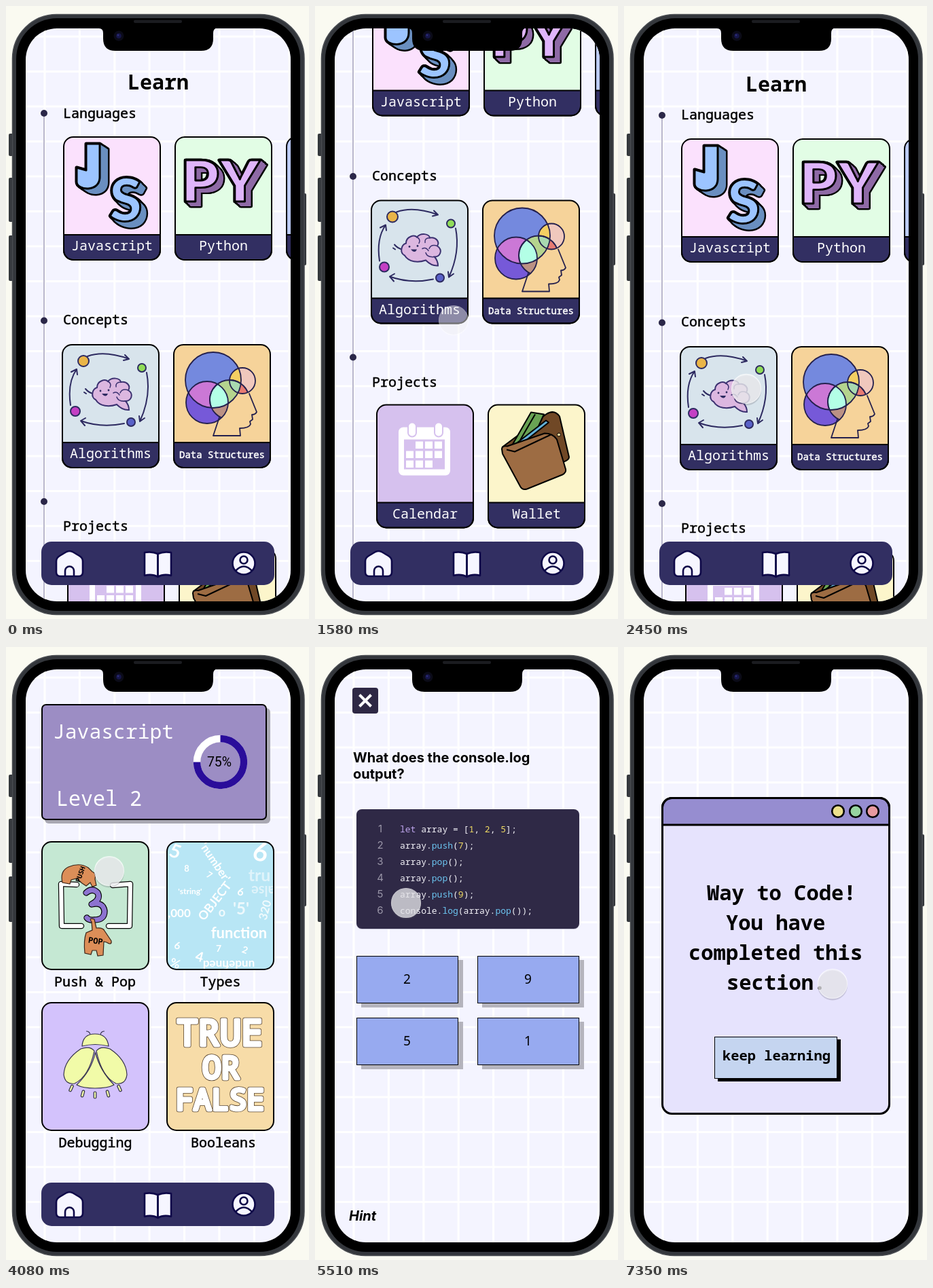
Write an HTML page that moves like this. It is 446 px wide and 903 px high and loops after 8 s.

```html
<!DOCTYPE html>
<html lang="en">
<head>
<meta charset="utf-8">
<title>Learning app</title>
<style>
html, body { margin: 0; width: 100%; height: 100%; overflow: hidden; background: #fafaf1; }
svg { display: block; width: 100%; height: 100%; }
text { white-space: pre; font-family: "Noto Sans Mono", monospace; }
.sans { font-family: Inter, sans-serif; }
.medium { stroke: currentColor; stroke-width: .5px; }
.heavy { font: 900 87px Lato, sans-serif; }
.round { fill: none; stroke-linecap: round; stroke-linejoin: round; }
</style>
</head>
<body>
<svg id="stage" viewBox="0 0 446 903"></svg>
<script>
const INK = '#2d2a60', NAVY = '#322f62';

// ---- drawing helpers ----
const rect = (x, y, w, h, fill, extra = '') =>
  `<rect x="${x}" y="${y}" width="${w}" height="${h}" fill="${fill}" ${extra}/>`;
const circle = (x, y, r, fill, extra = '') =>
  `<circle cx="${x}" cy="${y}" r="${r}" fill="${fill}" ${extra}/>`;
const path = (d, fill = 'none', extra = '') => `<path d="${d}" fill="${fill}" ${extra}/>`;
const text = (x, y, size, label, extra = '') =>
  `<text x="${x}" y="${y}" font-size="${size}" ${extra}>${label}</text>`;
const group = (content, extra = '') => `<g ${extra}>${content}</g>`;
const centred = 'text-anchor="middle"';
const outline = (width, color = '#000') => `stroke="${color}" stroke-width="${width}"`;

// Thick line with a dark rim
const tube = (d, color, width) =>
  path(d, 'none', `class="round" ${outline(width + 2.4)}`) +
  path(d, 'none', `class="round" ${outline(width, color)}`);

// Solid letter with depth towards (dx, dy)
function extrude(shape, dx, dy, face, side) {
  const layers = Array.from({ length: 12 }, (_, i) =>
    group(shape, `transform="translate(${dx * (1 - i / 11)} ${dy * (1 - i / 11)})"`)).join('');
  return group(layers, `fill="#000" ${outline(5)} stroke-linejoin="round"`) +
    group(layers, `fill="${side}"`) +
    group(shape, `fill="${face}" ${outline(3)} stroke-linejoin="round"`);
}

function topicCard(x, y, label, color, art, size = 20) {
  const weight = size < 20 ? 'class="medium"' : '';
  return rect(x, y, 142, 181, color, 'rx="14"') + art +
    path(`M${x} ${y + 144}h142v23a14 14 0 0 1-14 14h-114a14 14 0 0 1-14-14z`, NAVY, outline(2)) +
    rect(x, y, 142, 181, 'none', `rx="14" ${outline(2)}`) +
    text(x + 71, y + 167, size, label, `${centred} ${weight} fill="#fff" color="#fff"`);
}

// ---- home page ----
const jsArt =
  extrude(path('M118 203H138V252C138 275 104 272 104 259V238L118 242Z', 'inherit'), 12, 8, '#9cc4ff', '#6a8fc0') +
  extrude('<text class="heavy" x="152" y="317">S</text>', 9, 9, '#9cc4ff', '#6a8fc0');

const pyArt = group(
  extrude('<text class="heavy" x="258" y="288">P</text>', 8, 8, '#dfb5fb', '#8f6aa6') +
  extrude('<text class="heavy" x="315" y="288">Y</text>', 9, 8, '#dfb5fb', '#8f6aa6'),
  'transform="translate(0 14) scale(1 .95)"');

const brainArt =
  path(`M120 516Q145 507 181 520M175 514L181 520 173 522 M207 540Q214 575 197 612M196 604L197 612 204 607
    M174 615Q140 622 110 611M117 607L110 611 116 618 M95 588Q90 555 104 535M96 539L104 535 105 543
    M129 571Q122 570 117 564M118 571L115 569`, 'none', `class="round" ${outline(2, INK)}`) +
  [[114, 523, 8, '#eab548'], [200, 533, 6, '#90dc58'], [184, 613, 6, '#5a62c8'], [102, 597, 7, '#c43fc4']]
    .map(([x, y, r, color]) => circle(x, y, r, color, outline(2, INK))).join('') +
  path(`M132 580C124 576 127 564 134 562C134 552 146 549 150 553C156 546 168 548 169 554C178 552 184 560 180 566
    C189 572 184 582 176 582Q181 588 181 595C172 596 166 590 163 587C152 591 138 590 132 580Z`,
    '#dcb7e0', outline(2, '#3b3170')) +
  path('M150 553Q156 556 153 562M169 554Q161 554 162 561M180 566Q171 563 168 570M176 582Q165 583 163 576M158 570Q163 567 167 573',
    'none', `class="round" ${outline(1.5, '#3b3170')}`) +
  circle(139, 567, 1.4, INK) + circle(151, 566, 1.4, INK) + path('M141 571H150Q147 578 141 571Z', INK);

const rings = [[305, 551, 41], [296, 584, 31], [329, 580, 29], [348, 552, 19]];
const ring = (i, fill, extra) => circle(...rings[i], fill, extra);
const within = (i, content) => group(content, `clip-path="url(#ring${i})"`);
const ringLine = i => ring(i, 'none', outline(1.8, '#24204d'));
const headArt =
  ring(0, '#7489de') + ring(1, '#7659d8') + ring(3, '#f0c8bd') +
  within(0, ring(1, '#cb78d6') + ring(2, '#b5d48e') + ring(3, '#f4cf62')) +
  within(1, ring(2, '#bb9184') + within(0, ring(2, '#b3ffe6'))) +
  within(2, ring(3, '#e77b72') + within(0, ring(3, '#a8d9b0'))) +
  [0, 1, 3].map(i => ringLine(i) + within(i, ringLine(2))).join('') +
  path('M358 571L369 598Q367 602 362 602L363 609 359 612 360 616Q358 622 344 622L345 633H305L314 606', 'none',
    `class="round" ${outline(1.8, '#24204d')}`);

// Days of the month, without the first and last
const days = Array.from({ length: 12 }, (_, i) => i % 11 === 0 ? '' :
  rect(134 + i % 4 * 14, 854 + Math.floor(i / 4) * 14, 11, 10.5, '#fff')).join('');
const calendarArt = rect(123, 833, 76, 71, '#fff', 'rx="7"') +
  rect(131, 851, 60, 44, '#d6c1ee') + days +
  [143, 182].map(x => rect(x - 6, 826, 12, 21, '#fff', `rx="6" ${outline(2, '#d6c1ee')}`)).join('');

const walletArt = group(
  path('M276 862L340 814Q352 806 360 817L374 877Q374 881 366 884L340 890Z', '#704826') +
  path('M291 858L318 811 337 814 326 838 298 862Z', '#69a354') +
  path('M302 852L324 814') +
  path('M287 864L340 823 344 826 292 867Z', '#62b0d8') +
  path('M275 865Q275 860 283 861L338 842Q350 842 356 851L369 895Q370 900 364 903L312 924Q305 926 302 920L276 872Z', '#9d6c43') +
  path('M282 866L294 869 347 844') + circle(359, 844, 2.5, '#eed79a', 'stroke-width="1"'),
  `${outline(2)} stroke-linejoin="round"`);

const heading = (y, label, dotY) =>
  circle(56, dotY, 5, '#2b2748') + text(84, y, 20, label, 'class="medium"');

const homePage =
  rect(55, 158, 2, 1000, '#b9b7cc') +
  text(179, 123, 30, 'Learn', 'font-weight="700"') +
  heading(164.5, 'Languages', 158) + heading(469, 'Concepts', 463.5) + heading(773, 'Projects', 730) +
  topicCard(85, 193, 'Javascript', '#fbe1fd', jsArt) +
  topicCard(249, 193, 'Python', '#e2fde5', pyArt) +
  topicCard(413, 193, '', '#bccbf6', '') +
  topicCard(83, 499, 'Algorithms', '#d8e4ec', brainArt) +
  topicCard(247, 499, 'Data Structures', '#f6d39a', headArt, 14) +
  topicCard(91, 800, 'Calendar', '#d6c1ee', calendarArt) +
  topicCard(255, 800, 'Wallet', '#fcf5cb', walletArt);

// ---- level page ----
const bearFill = '#dc8e58';
const bearLine = outline(1.2, '#3a2418');
const pushArt =
  tube('M104 350L81 349 82 411 111 411', '#fff', 6) + tube('M157 351L183 349 182 411 151 411', '#fff', 6) +
  path('M83 347Q79 330 92 324Q108 317 121 325L127 331Q133 333 131 342L133 351 127 353 124 347 118 352 112 348 104 341 96 343 94 349Z', bearFill, bearLine) +
  tube('M118 362Q127 354 135 362Q140 372 126 379Q143 375 145 389Q145 402 130 402Q122 403 119 399', '#8d73d0', 7) +
  path('M126 405Q121 398 130 401L133 414Q143 413 145 418L155 433Q156 440 148 435L144 434 143 454 135 455 133 447 127 447 125 453 116 451Q114 432 118 421L127 417Z', bearFill, bearLine) +
  text(110, 338, 10, 'PUSH', `${centred} font-weight="700" transform="rotate(-70 110 335)"`) +
  text(132, 437, 12, 'POP', `${centred} font-weight="700" transform="rotate(8 132 432)"`);

const typeWords = [
  ['5', 246, 310, 28, 20], ["'number'", 303, 320, 17, 56], ['6', 372, 315, 38, 12], ['8', 266, 331, 13, 0],
  ['tru', 373, 345, 25, 0, .55], ['false', 382, 352, 20, 180, .55], ['7', 297, 340, 13, 30], ["'string'", 271, 364, 12, 0],
  ['6', 344, 366, 16, 15], ['OBJECT', 312, 378, 18, -52], [',000', 255, 398, 17, 0], ['o', 318, 397, 18, 0, .8],
  ["'5'", 346, 394, 24, 0, .75], ['320', 387, 389, 17, -75, .8], ['function', 343, 429, 22, 0], ['6', 251, 445, 15, 15],
  ['7', 313, 449, 14, 0], ['2', 350, 451, 14, 20], ['4', 283, 463, 20, 15], ['undefined', 328, 462, 17, 180], ['%', 247, 472, 18, 20]
];
const typesArt = group(typeWords.map(([word, x, y, size, angle, alpha = 1]) =>
  `<text x="${x}" y="${y}" transform="rotate(${angle} ${x} ${y})" opacity="${alpha}" text-anchor="middle"
    style="font:700 ${size}px Lato, sans-serif">${word}</text>`).join(''), 'fill="#fff" clip-path="url(#types)"');

const wing = 'M130 595Q124 587 110 592Q86 608 85 630Q87 645 101 643Q122 633 130 595Z';
const bugArt = group(
  path('M112 588Q113 570 131 570Q149 570 151 588Q131 583 112 588Z', 'inherit') +
  path('M124 571Q123 566 118 566M139 571Q140 566 145 566') +
  path(wing, 'inherit') + path(wing, 'inherit', 'transform="translate(263 0) scale(-1 1)"') +
  path('M131.5 597Q126 624 104 645Q113 650 131 650Q150 650 159 645Q138 624 131.5 597Z', 'inherit') +
  [[96, 650, 25], [113, 658, 15], [131, 660, 0], [150, 658, -15], [167, 650, -25]].map(([x, y, angle]) =>
    rect(x - 1.8, y - 5, 3.6, 10, 'inherit', `rx="1.8" transform="rotate(${angle} ${x} ${y})"`)).join(''),
  `fill="#f1fba8" ${outline(1.2, '#33304a')} stroke-linejoin="round"`);

const boolLine = (x, y, size, word) =>
  text(x, y, size, word, `${outline(6.6, '#5a4630')} stroke-linejoin="round"`) +
  text(x, y, size, word, `fill="#fff" ${outline(5, '#fff')} stroke-linejoin="round"`);
const booleanArt = boolLine(251, 587, 53, 'TRUE') + boolLine(289, 636, 46, 'OR') + boolLine(250, 682, 43.5, 'FALSE');

const lessonCard = (x, y, color, art, label, labelX) =>
  rect(x, y, 157, 188, color, `rx="14" ${outline(2)}`) + art +
  text(labelX, y + 213, 20, label, `${centred} class="medium"`);

const levelPage =
  rect(57, 90, 332, 170, '#a9a8b2', 'rx="6"') +
  rect(53, 85, 330, 169, '#9c8dc4', `rx="6" ${outline(2)}`) +
  text(69, 135, 29.7, 'Javascript', 'fill="#fff"') + text(74, 234, 30, 'Level 2', 'fill="#fff"') +
  circle(315.5, 169.5, 34.5, 'none', outline(10.5, '#fff')) +
  path('M315.5 135A34.5 34.5 0 1 1 281 169.5', 'none', outline(10.5, '#2a0d9a')) +
  text(314, 176, 19.5, '75%', `${centred} style="font-family:Roboto,sans-serif"`) +
  lessonCard(53, 287, '#c5e8d3', pushArt, 'Push &amp; Pop', 131) +
  lessonCard(237, 287, '#b8e6f5', typesArt, 'Types', 315.5) +
  lessonCard(53, 524, '#d3c2fc', bugArt, 'Debugging', 131.5) +
  lessonCard(237, 524, '#f7dca8', booleanArt, 'Booleans', 320);

const navBar = rect(52, 789, 343, 64, NAVY, 'rx="15"') + group(
  path('M74 818Q74 813 79 810L89 804Q93.5 802 98 804L108 810Q113 813 113 818V834Q113 840 107 840H80Q74 840 74 834Z', 'inherit') +
  path('M87 840V832a6.5 6.5 0 0 1 13 0V840') +
  path('M223.5 807Q215 803 204 805V839Q215 836 223.5 841Q232 836 243 839V805Q232 803 223.5 807ZV841', 'inherit') +
  path('M223.5 807V841') +
  circle(350, 821, 16.5, 'inherit') + circle(350, 816, 5.5, 'none') + path('M338 832Q350 819 362 832'),
  `fill="#f6f6ff" ${outline(2.6, '#0e0848')} stroke-linejoin="round"`);

// ---- quiz page ----
const codeLines = ['let array = [1, 2, 5];', 'array.push(7);', 'array.pop();', 'array.pop();', 'array.push(9);', 'console.log(array.pop());'];
const highlight = line => line.replace(/\b(let)\b|(\d)|\b(push|pop|log)\b/g, (word, keyword, digit) =>
  `<tspan fill="${keyword ? '#bfa6ee' : digit ? '#f2dc62' : '#6cc6f2'}">${word}</tspan>`);
const answer = (x, y, label) =>
  rect(x + 7, y + 6, 150, 70, '#b5b4bd') +
  rect(x + .5, y + .5, 149, 69, '#97aaf0', outline(1)) +
  `<text x="${x + 74.5}" y="${y + 41}" font-size="19" ${centred} style="font-family:'Noto Sans',sans-serif">${label}</text>`;

const quizPage =
  rect(55, 60, 38, 38, '#2e2844', 'rx="4"') +
  path('M65.5 70.5L82.5 87.5M82.5 70.5L65.5 87.5', 'none', outline(4, '#fff')) +
  text(56, 170, 20, 'What does the console.log', 'class="sans" font-weight="700"') +
  text(56, 194, 20, 'output?', 'class="sans" font-weight="700"') +
  rect(61, 240, 328, 176, '#c9c8d8', 'rx="8"') +
  rect(61, 239, 328, 176, '#2f2946', 'rx="8"') +
  codeLines.map((line, i) =>
    text(96, 273 + i * 24, 15, i + 1, `class="sans" ${centred} fill="#9a96a8"`) +
    text(125, 272.5 + i * 24, 13, highlight(line), 'fill="#f3f2f8"')).join('') +
  answer(61, 455, 2) + answer(239, 455, 9) + answer(61, 546, 5) + answer(239, 546, 1) +
  text(50, 845, 20, 'Hint', 'class="sans" font-weight="700" font-style="italic"');

// ---- finish page ----
const bold = 'font-weight="700"';
const finishPage =
  rect(56.5, 222.5, 334, 465, '#e6e3fd', 'rx="14"') +
  path('M56.5 262V236.5a14 14 0 0 1 14-14H376.5a14 14 0 0 1 14 14V262Z', '#968dd0', outline(3)) +
  rect(56.5, 222.5, 334, 465, 'none', `rx="14" ${outline(3)}`) +
  [[315, '#ece08c'], [341, '#96d4a0'], [366, '#e89aa0']].map(([x, color]) => circle(x, 242, 8.8, color, outline(2.6))).join('') +
  [[122, 'Way to Code!'], [150, 'You have'], [95, 'completed this'], [151, 'section.']]
    .map(([x, line], i) => text(x, 373 + i * 44, 30.5, line, bold)).join('') +
  rect(138, 578, 181, 62, '#000') + rect(133.5, 574.5, 180, 61, '#c5d5f0', outline(1)) +
  text(145, 609, 20.4, 'keep learning', bold);

// ---- phone ----
const SCREEN = 'x="29" y="33" width="390" height="844" rx="46"';
const gridLines = Array.from({ length: 8 }, (_, i) => `M${57 + i * 51.4} 33V877`).join('') +
  Array.from({ length: 16 }, (_, i) => `M29 ${45 + i * 51.5}H419`).join('');
const shell =
  [[188, 33], [253, 65], [338, 67]].map(([y, h]) => rect(4, y, 7, h, '#35383d', 'rx="2"')).join('') +
  rect(436, 276, 6, 106, '#35383d', 'rx="2"') +
  rect(9.5, 12.5, 429.5, 884, '#34373c', `rx="65" ${outline(1.5, '#484b50')}`) +
  rect(15, 18, 418, 873, '#000', 'rx="60"');
const notch =
  path('M137 32H311Q305 33 305 40V48Q305 66 287 66H161Q143 66 143 48V40Q143 33 137 33Z', '#000') +
  rect(188, 20.5, 71, 4.5, '#1b1c20', 'rx="2"') +
  circle(166, 44, 7.5, '#0b0b18') + circle(166, 44, 3.8, '#16164a') + circle(165, 43, 1.4, '#2d2d78');

const stage = document.getElementById('stage');
stage.innerHTML = `<defs>
    <clipPath id="screen"><rect ${SCREEN}/></clipPath>
    <clipPath id="types"><rect x="238" y="288" width="155" height="186" rx="13"/></clipPath>
    ${rings.map((r, i) => `<clipPath id="ring${i}">${circle(...r)}</clipPath>`).join('')}
  </defs>` + shell +
  group(rect(29, 33, 390, 844, '#f4f4ff') + path(gridLines, 'none', outline(3, '#fff')) +
    group(homePage, 'id="home"') + group(levelPage, 'id="level"') + group(navBar, 'id="nav"') +
    group(quizPage, 'id="quiz"') + group(finishPage, 'id="finish"') +
    group(circle(0, 2.5, 22, '#55555f', 'id="shade" opacity=".22"') +
      circle(0, 0, 21.5, '#f0f0f3', `id="touch" ${outline(1.2, '#fff')}`), 'id="cursor"'),
    'clip-path="url(#screen)"') + notch;

// ---- motion ----
const LOOP = 8000;
const scrollKeys = [[150, 0], [850, 212], [1580, 212.5], [2120, 0], [2290, -5], [2450, -3], [2930, 0]];
const cursorX = [[1170, 204], [1580, 204], [2120, 171], [2450, 180], [2800, 158.5], [4000, 158], [4080, 152], [4570, 134], [6100, 134], [6940, 307]];
const cursorY = [[150, 675], [850, 463], [1580, 463], [2120, 681], [2250, 673], [2800, 313], [3200, 312], [4000, 311], [4080, 330], [4570, 377], [6100, 377], [6940, 496]];
const touchAlpha = [[2290, .48], [2420, .78], [3040, .78], [3090, .5], [3200, .5], [3250, .78], [4750, .78], [4830, .5], [5060, .5], [5120, .72]];

function track(keys, t) {
  const next = keys.findIndex(([time]) => time > t);
  if (next === 0) return keys[0][1];
  if (next < 0) return keys[keys.length - 1][1];
  const [[t0, a], [t1, b]] = [keys[next - 1], keys[next]];
  const p = (t - t0) / (t1 - t0);
  return a + (b - a) * p * p * (3 - 2 * p);
}

const el = id => document.getElementById(id);
const show = (id, visible) => el(id).setAttribute('display', visible ? 'inline' : 'none');

function draw(t) {
  show('home', t < 3250);
  show('level', t >= 3250 && t < 5340);
  show('nav', t < 5340);
  show('quiz', t >= 5340 && t < 7270);
  show('finish', t >= 7270);
  show('cursor', t >= 150);
  const alpha = track(touchAlpha, t);
  el('home').setAttribute('transform', `translate(0 ${-track(scrollKeys, t)})`);
  el('cursor').setAttribute('transform', `translate(${track(cursorX, t)} ${track(cursorY, t)})`);
  el('touch').setAttribute('opacity', alpha);
  show('shade', alpha > .6);
}

const start = performance.now();
function frame() {
  draw((performance.now() - start) % LOOP);
  requestAnimationFrame(frame);
}
frame();
</script>
</body>
</html>
```
